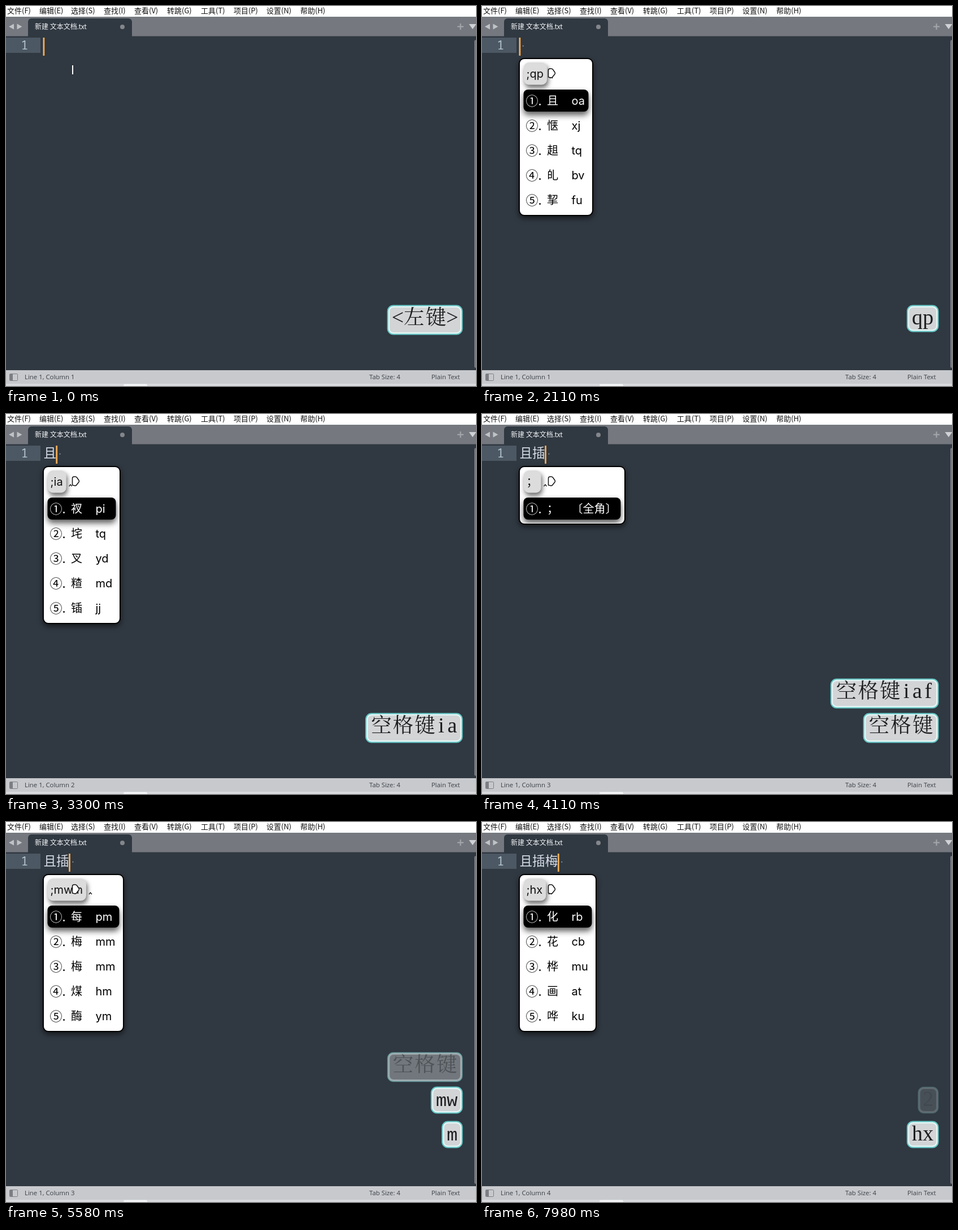
An HTML page with a canvas that plays this animation: 832x673 px, repeating every 8 s.

```html
<!DOCTYPE html>
<html lang="zh">
<meta charset="utf-8">
<title>Input method demo</title>
<style>
  html, body { margin: 0; height: 100%; overflow: hidden; background: #303841; }
  canvas { display: block; }
</style>
<canvas id="stage" width="832" height="673"></canvas>
<script>
const ctx = document.getElementById('stage').getContext('2d');
const LOOP = 8000;
const CJK = '"Noto Sans CJK SC", "Noto Sans CJK", sans-serif';
const MENU = { 2: '文件(F)', 59: '编辑(E)', 115: '选择(S)', 173: '查找(I)', 227: '查看(V)',
  285: '转跳(G)', 345: '工具(T)', 403: '项目(P)', 461: '设置(N)', 521: '帮助(H)' };
const COMMITS = [2900, 4110, 6510];

// [strokes, time of each stroke, start of fade-out]
const KEYS = [
  [['<左键>'], [0], 660],
  [[';'], [400], 1720],
  [['q', 'p'], [920, 1050], 2380],
  [['空格键', 'i', 'a', 'f'], [2770, 3170, 3300, 3710], 5030],
  [['空格键'], [3970], 5430],
  [['m', 'w'], [4640, 4770], 6110],
  [['m'], [5580], 6910],
  [['2'], [6380], 7710],
  [['h', 'x'], [6910, 7040], LOOP],
];

// [time, typed code, candidates, their shape codes]
const SEMICOLON = ['；', '；', '〔全角〕'];
const PANELS = [
  [530, ...SEMICOLON],
  [1050, ';q', '去请前且起', 'ts yq dd oa zj'],
  [1190, ';qp', '且惬趄癿挈', 'oa xj tq bv fu'],
  [2900, ...SEMICOLON],
  [3170, ';i', '出成吃车场', 'uk gd kq ii tn'],
  [3300, ';ia', '衩垞叉𥻗锸', 'pi tq yd md jj'],
  [3710, ';iaf', '插搽', 'fj fm'],
  [4110, ...SEMICOLON],
  [4640, ';m', '吗没们美每', 'km dy rm yd pm'],
  [4770, ';mw', '没美每妹媒', 'dy yd pm nw nm'],
  [5580, ';mwm', '每梅梅煤酶', 'pm mm mm hm ym'],
  [6510, ...SEMICOLON],
  [7040, ';h', '和好会后还', 'hk nz ry kk zb'],
  [7170, ';hx', '化花桦画哗', 'rb cb mu at ku'],
];

function rect(x, y, w, h, color, radius = 0) {
  ctx.fillStyle = color;
  ctx.beginPath();
  ctx.roundRect(x, y, w, h, radius);
  ctx.fill();
}

function frame(x, y, w, h, color, lineWidth, radius) {
  ctx.strokeStyle = color;
  ctx.lineWidth = lineWidth;
  ctx.beginPath();
  ctx.roundRect(x, y, w, h, radius);
  ctx.stroke();
}

function text(str, x, y, font, color) {
  ctx.font = font;
  ctx.fillStyle = color;
  ctx.fillText(str, x, y);
}

function shape(path, fill, stroke, lineWidth = 1.5) {
  const p = new Path2D(path);
  if (fill) { ctx.fillStyle = fill; ctx.fill(p); }
  if (stroke) { ctx.strokeStyle = stroke; ctx.lineWidth = lineWidth; ctx.stroke(p); }
}

function withShadow(dx, dy, blur, alpha, draw) {
  ctx.save();
  ctx.shadowColor = `rgba(0,0,0,${alpha})`;
  ctx.shadowOffsetX = dx;
  ctx.shadowOffsetY = dy;
  ctx.shadowBlur = blur;
  draw();
  ctx.restore();
}

function drawWindow(column) {
  rect(0, 0, 832, 673, '#303841');
  rect(0, 0, 832, 19, '#fff');
  for (const x in MENU) text(MENU[x], +x, 13, '13px ' + CJK, '#111');

  rect(0, 19, 832, 34.5, '#75797f');
  rect(39, 22, 184, 32, '#303841', [6, 6, 0, 0]);
  shape('M5 36.5l9-5v10zM28.500 36.500l-9-5v10z', '#bfc2c6');
  text('新建 文本文档.txt', 51, 41, '12px ' + CJK, '#f2f4f6');
  shape('M202 37a4 4 0 1 1 8 0a4 4 0 1 1-8 0', '#83868b');
  shape('M799 36.500h11M804.500 31v11', null, '#a5a8ac', 2);
  shape('M819.500 32h13l-6.500 9z', '#d0d2d5');

  rect(0, 56, 61, 27, '#4c5863');
  text('1', 26.5, 77, '21px "Noto Sans Mono", monospace', '#b3c5d1');
  rect(829, 60, 8, 581, '#747a82', 3);

  rect(0, 645, 832, 28, '#c7c9cd');
  rect(0, 669, 832, 4, '#d8dade');
  rect(208, 669.5, 42, 8, '#f4f5f7', 3);
  frame(6.5, 651.5, 14, 12, '#7b7e83', 1, 1);
  rect(7, 652, 5, 11, '#7b7e83');
  const font = '11.4px "Open Sans", sans-serif';
  text('Line 1, Column ' + column, 33, 661, font, '#3b3f44');
  text('Tab Size: 4', 643, 661, font, '#3b3f44');
  text('Plain Text', 753, 661, font, '#3b3f44');
}

function drawPanel([, typed, words, codes]) {
  const font = '20px Inter, ' + CJK;
  const codeList = codes.split(' ');
  ctx.font = font;
  const chipWidth = ctx.measureText(typed).width + 10.5;
  const codeWidth = Math.max(...codeList.map(c => ctx.measureText(c).width));
  const width = Math.round(codeWidth + 108.6);
  const height = 60 + 44 * codeList.length;

  withShadow(0, 4, 10, .55, () => rect(65, 92, width, height, '#000', 10));
  rect(67, 94, width - 4, height - 4, '#fff', 8);
  withShadow(2, 5, 9, .6, () => rect(74, 100, chipWidth, 39.5, '#dcdcdc', 9));
  text(typed, 78.5, 127, font, '#111');
  const caret = 74 + chipWidth + 5;
  shape(`M${caret} 128l2.500-3l2.500 3`, null, '#111', 1.2);

  ctx.save();
  ctx.beginPath();
  ctx.rect(67, 94, width - 4, height - 5);
  ctx.clip();
  withShadow(0, 6, 11, .65, () => rect(73.5, 148, width - 17, 39, '#000', 8));
  ctx.restore();

  [...words].forEach((word, i) => {
    const y = 175 + 44 * i, color = i ? '#000' : '#fff';
    text('①②③④⑤'[i] + '.', 77.5, y + .5, '22px ' + CJK, color);
    text(word, 115, y, '20px ' + CJK, color);
    text(codeList[i], 158.5, y, font, color);
  });
  // Mouse pointer
  shape('M117.500 114q0-3 3-3h2q2 0 3 1.500l3.500 5q1 1.500 0 3l-4 5q-1 1.500-3 1.500l-4.500-1z', '#fff', '#111');
}

function drawKey(label, top, alpha) {
  const cell = 19.3;
  const isWide = c => c > '\u2e80';
  const chars = [...label];
  const wide = chars.some(isWide);
  const width = 17 + cell * chars.reduce((n, c) => n + (isWide(c) ? 2 : 1), 0);
  const height = wide ? 52 : 47;
  const left = 808 - width;
  ctx.globalAlpha = alpha;
  rect(left, top, width, height, '#d2d4d6', 10);
  frame(left + 2.5, top + 2.5, width - 5, height - 5, '#e3f6f5', 3, 8);
  frame(left + .5, top + .5, width - 1, height - 1, '#62c6c5', 2, 10);
  ctx.textAlign = 'center';
  let x = left + 8.5;
  for (const c of chars) {
    const step = isWide(c) ? 2 * cell : cell;
    const font = isWide(c) ? '300 36.5px "Noto Serif CJK SC", ' + CJK
      : /[mw]/.test(c) ? '32px "Liberation Mono", monospace'
      : '38px "Liberation Serif", serif';
    text(c, x + step / 2, top + 34, font, '#1c1d1f');
    x += step;
  }
  ctx.textAlign = 'left';
  ctx.globalAlpha = 1;
}

function drawKeys(t) {
  const pressed = KEYS.filter(([, times]) => times[0] <= t);
  pressed.reverse().forEach(([strokes, times, fade], row) => {
    const label = strokes.filter((_, i) => times[i] <= t).join('');
    const alpha = t < fade ? 1 : [.7, .4, .15][Math.floor((t - fade + 5) / 131)];
    if (alpha) drawKey(label, 530 - 61 * row, alpha);
  });
}

function draw(t) {
  const count = COMMITS.filter(time => time <= t).length;
  const panel = PANELS.findLast(([time]) => time <= t);
  const caretX = 65.5 + 22.8 * count;
  drawWindow(count + 1);
  text('且插梅'.slice(0, count), 66.5, 76.5, '300 22.6px ' + CJK, '#d8dee9');
  rect(caretX, 56, 2.8, 32, '#f9ae58');
  if (panel) {
    rect(caretX + 6, 69.5, 2.6, 2.6, '#737b84', 1.3);
    drawPanel(panel);
  } else {
    rect(117, 105, 2, 16, '#fff');
  }
  drawKeys(t);
}

function tick() {
  draw(performance.now() % LOOP);
  requestAnimationFrame(tick);
}
tick();
</script>
</html>
```
